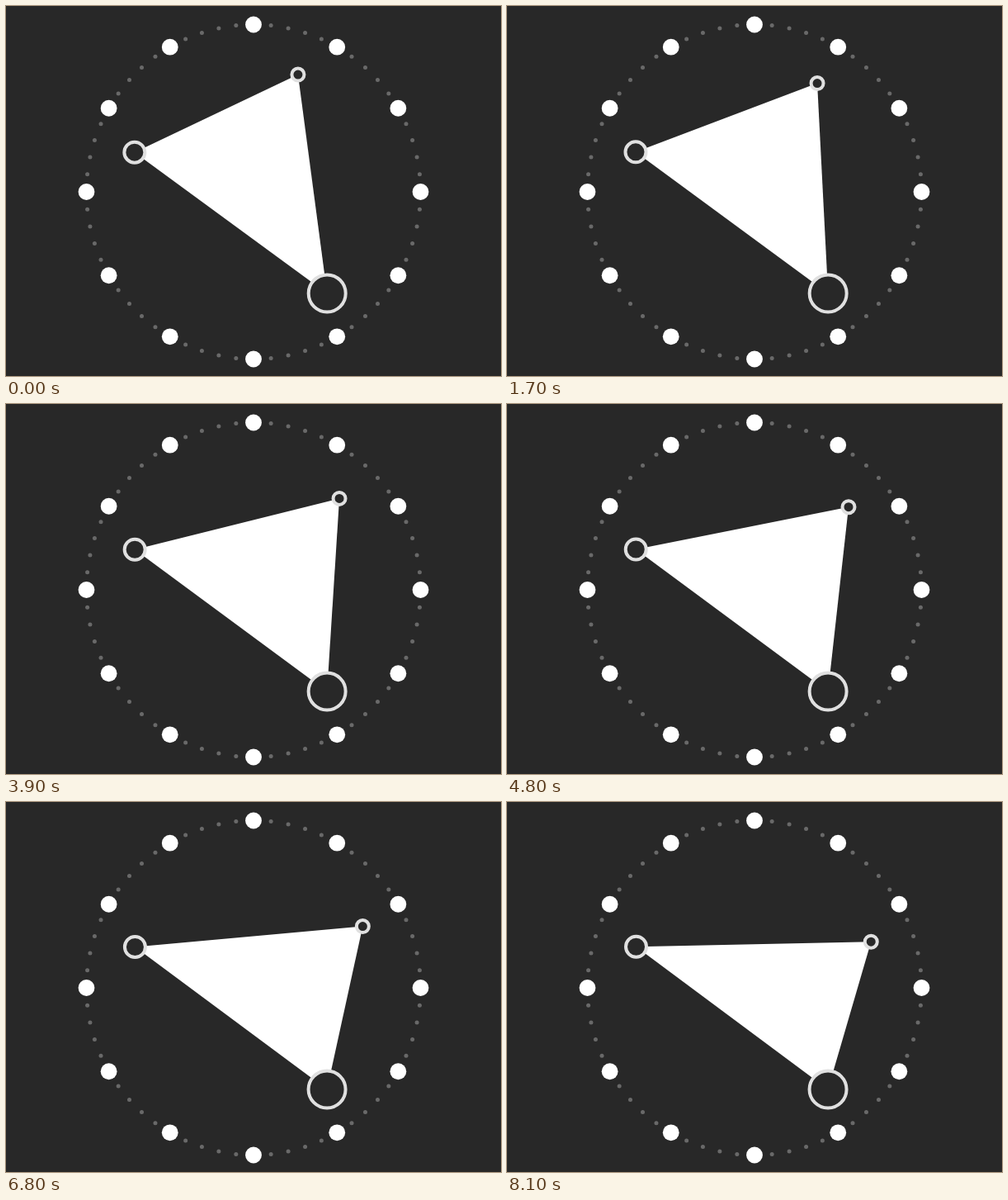
Write an HTML page with a canvas that moves like this. It is 600 by 448 pixels and loops after 8.2 s.

```html
<!DOCTYPE html>
<html lang="en">
<head>
<meta charset="utf-8">
<title>Triangle clock</title>
<style>
html, body { margin: 0; width: 100%; height: 100%; overflow: hidden; background: #282828; }
canvas { display: block; }
</style>
</head>
<body>
<canvas id="clock" width="600" height="448"></canvas>
<script>
const ctx = document.getElementById('clock').getContext('2d');
const LOOP = 8200, STEP = 100;
const CX = 300, CY = 225, DIAL = 202.5, HAND = DIAL * 0.75;
const BG = '#282828';

function polar(deg, r) {
  const a = deg * Math.PI / 180;
  return [CX + r * Math.sin(a), CY - r * Math.cos(a)];
}

function disc([x, y], r, fill) {
  ctx.beginPath();
  ctx.arc(x, y, r, 0, Math.PI * 2);
  ctx.fillStyle = fill;
  ctx.fill();
}

function ring(p, r) {
  disc(p, r, BG);
  ctx.strokeStyle = '#e0e0e0';
  ctx.lineWidth = 4;
  ctx.stroke();
}

// Degrees of the second hand; it starts slightly ahead and settles to 6° per second.
function secondAngle(t) {
  return 19.85 + 6 * t + 0.95 * Math.max(0, 1 - t / 0.9);
}

function draw(ms) {
  const t = Math.floor(ms / STEP) * STEP / 1000;
  const sec = secondAngle(t);
  const min = 288 + sec / 60;
  const hour = 120 + min / 12;

  ctx.fillStyle = BG;
  ctx.fillRect(0, 0, 600, 448);

  for (let i = 0; i < 60; i++) {
    const major = i % 5 === 0;
    disc(polar(i * 6, DIAL), major ? 9.9 : 2.5, major ? '#fff' : '#696969');
  }

  const tips = [hour, min, sec].map(a => polar(a, HAND));
  ctx.beginPath();
  tips.forEach(p => ctx.lineTo(...p));
  ctx.closePath();
  ctx.fillStyle = '#fff';
  ctx.fill();

  [22.5, 12.5, 7.5].forEach((r, i) => ring(tips[i], r));
}

const start = performance.now();
function tick() {
  draw((performance.now() - start) % LOOP);
  requestAnimationFrame(tick);
}
tick();
</script>
</body>
</html>
```
